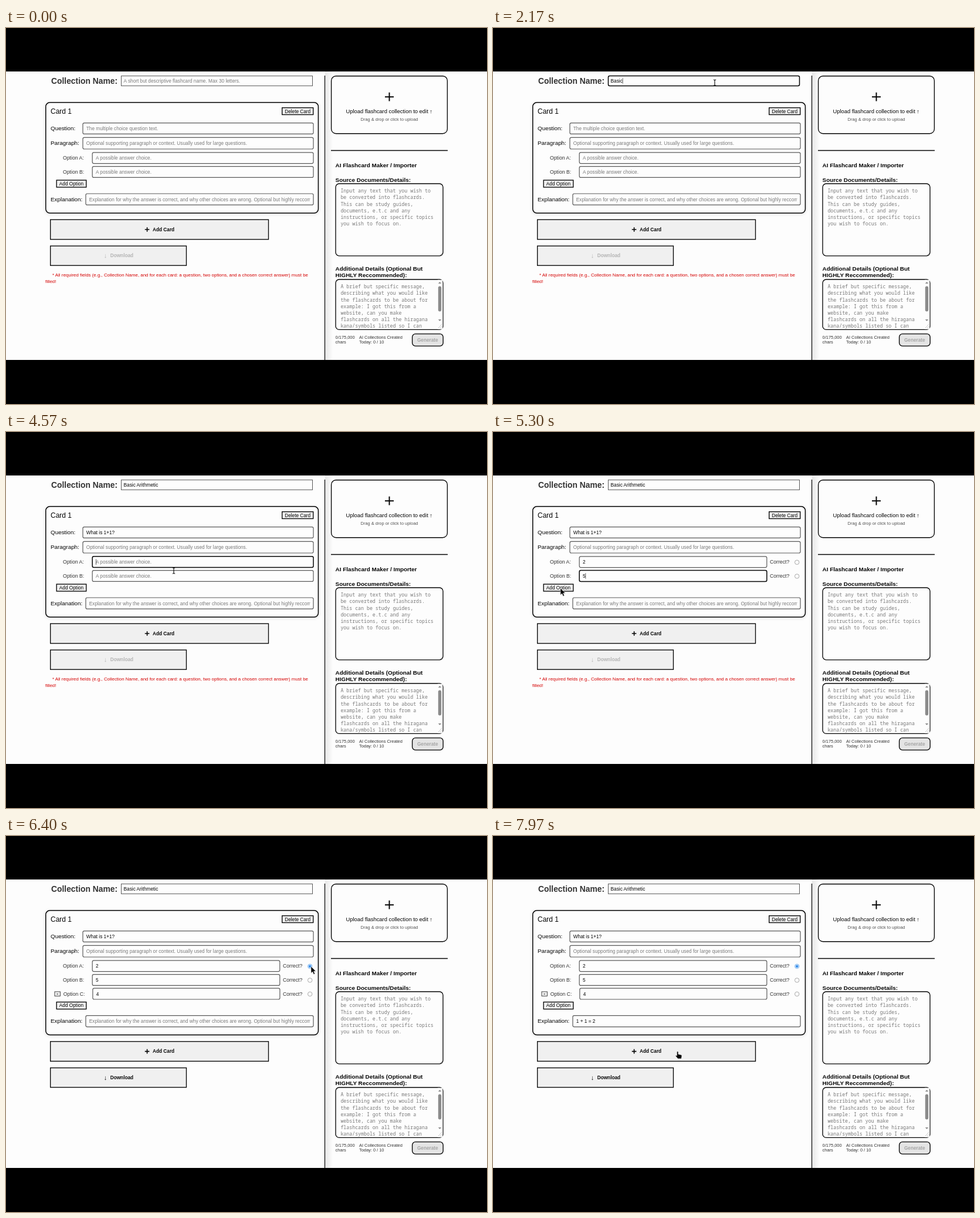
Recreate the animation shown at these times as an HTML page. Size 820 px wide and 640 px high, loop 8000 ms.

```html
<!DOCTYPE html>
<html lang="en">
<head>
<meta charset="utf-8">
<title>Flashcard maker</title>
<style>
html, body { margin: 0; width: 100%; height: 100%; overflow: hidden; background: #000; }
svg { display: block; width: 820px; height: 640px; }
text { font-family: "Liberation Sans", Arial, sans-serif; font-size: 8.25px; white-space: pre; }
.bold { font-weight: bold; }
.mono { font-family: "Noto Sans Mono", "DejaVu Sans Mono", monospace; }
.soft { filter: drop-shadow(0 1.5px 2.5px rgba(0, 0, 0, .15)); }
</style>
</head>
<body>
<svg id="stage" viewBox="0 0 820 640"></svg>
<script>
const LOOP = 8000, ROW = 23.6;
const PAGE = '#fdfdfd', INK = '#060606', SOFT = '#333', DIM = '#7a7a7a', BUTTON = '#f0f0f0', BLUE = '#3b90ea';
const SHIFT_AT = 5320, CORRECT_AT = 4980, PICK_AT = 6340;
const stage = document.getElementById('stage');

function el(tag, attrs, parent = stage, content) {
  const node = document.createElementNS('http://www.w3.org/2000/svg', tag);
  for (const key in attrs) node.setAttribute(key, attrs[key]);
  if (content !== undefined) node.textContent = content;
  parent.appendChild(node);
  return node;
}
const set = (node, attrs) => { for (const key in attrs) node.setAttribute(key, attrs[key]); };
const show = (node, on) => node.setAttribute('visibility', on ? 'visible' : 'hidden');
const group = (parent = stage) => el('g', {}, parent);

function box(x, y, w, h, parent, opts = {}) {
  return el('rect', { x, y, width: w, height: h, fill: PAGE, stroke: INK, 'stroke-width': 1.35, ...opts }, parent);
}
function label(x, y, str, parent, size = 8.25, opts = {}) {
  return el('text', { x, y, style: `font-size:${size}px;fill:${opts.fill || INK}`, class: opts.cls || '',
    'text-anchor': opts.anchor || 'start' }, parent, str);
}
function path(d, parent, opts = {}) {
  return el('path', { d, fill: 'none', stroke: INK, 'stroke-width': 1.4, ...opts }, parent);
}
function lines(x, y, pitch, rows, parent) {
  rows.forEach((row, i) => label(x, y + i * pitch, row, parent, 8.25, { cls: 'mono', fill: DIM }));
}

const defs = el('defs', {});
const fade = el('linearGradient', { id: 'fade' }, defs);
el('stop', { offset: 0, 'stop-color': '#e6e6e6' }, fade);
el('stop', { offset: 1, 'stop-color': PAGE }, fade);
const pageClip = el('clipPath', { id: 'page' }, defs);
el('rect', { x: 0, y: 74, width: 820, height: 491 }, pageClip);
const longClip = el('clipPath', { id: 'long' }, defs);
el('rect', { x: 138, y: 270, width: 380.5, height: 60 }, longClip);
const areaClip = el('clipPath', { id: 'area' }, defs);
el('rect', { x: 562, y: 429, width: 174, height: 82.5 }, areaClip);

el('rect', { width: 820, height: 640, fill: '#000' });
const page = el('g', { 'clip-path': 'url(#page)' });
el('rect', { y: 74, width: 820, height: 491, fill: PAGE }, page);

// Left column
label(77, 94.6, 'Collection Name:', page, 13.85, { cls: 'bold', fill: SOFT });
const card = box(67.8, 126.8, 464.6, 188.2, page, { rx: 7, 'stroke-width': 1.5, class: 'soft' });
label(76, 145.8, 'Card 1', page, 12);
box(470.7, 135.7, 53, 11.8, page, { fill: BUTTON });
label(497.2, 144.6, 'Delete Card', page, 8.25, { anchor: 'middle' });
label(76, 174.3, 'Question:', page, 9.9);
label(76, 199.3, 'Paragraph:', page, 9.9);
label(97, 224.2, 'Option A:', page, 8.67, { fill: SOFT });
label(97, 248, 'Option B:', page, 8.67, { fill: SOFT });

const rowC = group(page);
box(83, 265, 9.4, 7.4, rowC, { fill: BUTTON, stroke: SOFT, 'stroke-width': .9 });
path('M86.4 269h2.6', rowC, { 'stroke-width': .9 });
label(97.8, 271.6, 'Option C:', rowC, 8.67, { fill: SOFT });

const radios = [221.8, 245.5, 269].map((y, i) => {
  const g = group(page);
  label(472, y + 2.5, 'Correct?', g, 8.67, { fill: SOFT });
  const ring = el('circle', { cx: 518.2, cy: y, r: 3.7, fill: PAGE, stroke: '#858585', 'stroke-width': .7 }, g);
  const dot = el('circle', { cx: 518.2, cy: y, r: 2.4, fill: BLUE }, g);
  return { g, ring, dot, from: i < 2 ? CORRECT_AT : SHIFT_AT };
});

// Everything that slides down when a row is added
const lower = group(page);
box(86.2, 259, 50.6, 12, lower, { fill: BUTTON });
label(111.5, 267.9, 'Add Option', lower, 8.25, { anchor: 'middle' });
label(76, 294.6, 'Explanation:', lower, 9.9);
box(75.7, 326.2, 371.8, 33.6, lower, { fill: BUTTON });
path('M236.8 343h7.6M240.6 339.2v7.6', lower, { 'stroke-width': 1.6 });
label(250, 345.8, 'Add Card', lower, 8.25, { cls: 'bold' });
box(75.7, 371, 231.8, 33.2, lower, { fill: BUTTON });
const arrow = label(166.8, 391, '↓', lower, 11, { cls: 'bold' });
const download = label(177.7, 390.3, 'Download', lower, 8.25, { cls: 'bold' });
const warning = group(lower);
const red = { fill: '#d40000' };
label(79, 423.2, '* All required fields (e.g., Collection Name, and for each card: a question, two options, and a chosen correct answer) must be', warning, 7.92, red);
label(67, 434.3, 'filled!', warning, 7.92, red);

// Text fields: typing starts at `at`, one letter every `step` ms
const choice = 'A possible answer choice.';
const fields = [
  { x: 196.5, y: 81.6, w: 326, h: 16.8, pad: 4.1, rx: 0, thin: 1, hint: 'A short but descriptive flashcard name. Max 30 letters.',
    value: 'Basic Arithmetic', at: 1900, step: 60, focus: [1600, 3070] },
  { x: 131, y: 161.6, w: 393, h: 18.8, hint: 'The multiple choice question text.',
    value: 'What is 1+1?', at: 3120, step: 62, focus: [3070, 4400] },
  { x: 131, y: 186.4, w: 393, h: 19.6, hint: 'Optional supporting paragraph or context. Usually used for large questions.' },
  { x: 147.2, y: 211.8, w: 376.8, h: 18.8, narrow: 319.6, hint: choice, value: '2', at: 4680, focus: [4400, 4830] },
  { x: 147.2, y: 235.6, w: 376.8, h: 18.8, narrow: 319.6, hint: choice, value: '5', at: 4980, focus: [4830, 5310] },
  { x: 147.9, y: 259.2, w: 319, h: 18.8, from: SHIFT_AT, hint: choice, value: '4', at: 5690, focus: [5550, PICK_AT] },
  { x: 136, y: 282, w: 388, h: 19.2, slides: true, clip: 'url(#long)',
    hint: 'Explanation for why the answer is correct, and why other choices are wrong. Optional but highly reccommended.',
    value: '1 + 1 = 2', at: 7160, step: 58, focus: [7100, 7920] }
];
for (const f of fields) {
  f.pad = f.pad || 5.8;
  f.g = group(page);
  f.rect = box(f.x, f.y, f.w, f.h, f.g, { rx: f.rx ?? 2.5 });
  const inner = el('g', f.clip ? { 'clip-path': f.clip } : {}, f.g);
  f.text = label(f.x + f.pad, f.y + f.h / 2 + 2.9, f.hint, inner);
  f.caret = el('rect', { y: f.y + f.h / 2 - 4.8, width: .6, height: 9.6, fill: INK }, f.g);
}

// Right column
el('rect', { x: 544, y: 74, width: 13, height: 491, fill: 'url(#fade)' }, page);
path('M543.5 81V565', page, { 'stroke-width': 1.2 });
box(554.6, 81.7, 197.8, 98, page, { rx: 8 });
path('M646 117.2h15M653.5 109.8v14.8', page, { 'stroke-width': 2 });
label(653.3, 145.3, 'Upload flashcard collection to edit ↑', page, 9.4, { anchor: 'middle' });
label(653.5, 158, 'Drag & drop or click to upload', page, 7.43, { anchor: 'middle', fill: '#555' });
path('M554 208.5H753', page, { 'stroke-width': 1.3 });
label(561.6, 237.4, 'AI Flashcard Maker / Importer', page, 9.9, { cls: 'bold' });
label(561.6, 261.6, 'Source Documents/Details:', page, 9.9, { cls: 'bold' });
box(562, 265, 183, 122.8, page, { rx: 6 });
path('M740 387l4-4M742.6 387l1.6-1.6', page, { stroke: DIM, 'stroke-width': .6 });
lines(570.4, 280.3, 11.16, ['Input any text that you wish to', 'be converted into flashcards.', 'This can be study guides,',
  'documents, e.t.c and any', 'instructions, or specific topics', 'you wish to focus on.'], page);
label(561.6, 413, 'Additional Details (Optional But', page, 9.9, { cls: 'bold' });
label(561.6, 424.2, 'HIGHLY Reccommended):', page, 9.9, { cls: 'bold' });
box(562, 428, 183, 85.4, page, { rx: 6 });
const area = el('g', { 'clip-path': 'url(#area)' }, page);
lines(570.4, 443.2, 11.16, ['A brief but specific message,', 'describing what you would like', 'the flashcards to be about for',
  'example: I got this from a', 'website, can you make', 'flashcards on all the hiragana', 'kana/symbols listed so I can'], area);
// The scrollbar squares off the right corners
el('rect', { x: 736, y: 428.7, width: 8.3, height: 84, fill: PAGE }, page);
box(736.8, 439.5, 5.4, 43, page, { rx: 2.7, fill: '#8b8b8b', stroke: 'none' });
path('M736.8 435l2.7-3 2.7 3zM736.8 496l2.7 3 2.7-3z', page, { fill: '#8b8b8b', stroke: 'none' });
path('M737 511l6-7M740 511.5l3.6-4', page, { stroke: '#aaa', 'stroke-width': .6 });
[[561.6, 528.7, '0/175,000'], [561.6, 537.4, 'chars'], [602, 528.7, 'AI Collections Created'], [602, 537.4, 'Today: 0 / 10']]
  .forEach(([x, y, s]) => label(x, y, s, page, 7.43, { fill: SOFT }));
box(692.6, 520.6, 52.6, 20.8, page, { rx: 5.5, fill: '#e4e4e4' });
label(718.8, 533.9, 'Generate', page, 8.25, { cls: 'bold', anchor: 'middle', fill: '#a6a6a6' });

// Pointer
const pointer = group(page);
const shapes = {
  beam: path('M-2.2-5Q0-5 0-4Q0-5 2.2-5M0-4.4V4.4M-2.2 5Q0 5 0 4Q0 5 2.2 5', pointer, { 'stroke-width': 1.1 }),
  arrow: path('M0 0V11.4L2.6 9L4.6 13.4L6.6 12.5L4.7 8.2H8.2Z', pointer, { fill: INK, stroke: '#fff', 'stroke-width': .5 }),
  hand: path('M-1.4 .6Q-.3-.9 .8 .6V4.4L5.6 5.6Q7 6 6.8 7.6L6 12H.2L-3.6 7.6Q-3.6 6-1.4 7Z', pointer, { fill: INK, stroke: '#fff', 'stroke-width': .4 })
};
const moves = [
  [1150, 560, 66], [1550, 378, 93], [2880, 378, 93], [3060, 285, 174.5], [4150, 285, 174.5], [4370, 286, 221],
  [4480, 286, 221], [4640, 286, 246], [5040, 286, 246], [5280, 115, 266], [5380, 115, 266], [5530, 195, 270],
  [5640, 195, 270], [5750, 201, 283], [5900, 201, 283], [6300, 520, 222], [6880, 520, 222], [7080, 250, 315],
  [7680, 250, 315], [7910, 315, 367]
];
function pointerAt(t) {
  const next = moves.findIndex(m => m[0] > t);
  if (next < 0) return moves[moves.length - 1].slice(1);
  const [t0, x0, y0] = moves[next - 1], [t1, x1, y1] = moves[next];
  const k = (t - t0) / (t1 - t0), e = k * k * (3 - 2 * k);
  return [x0 + (x1 - x0) * e, y0 + (y1 - y0) * e];
}

function drawField(f, t, shift) {
  const dy = f.slides ? shift : 0;
  const count = f.value && t >= f.at ? Math.floor((t - f.at) / (f.step || 60)) + 1 : 0;
  const str = f.value ? f.value.slice(0, count) : '';
  const focused = !!f.focus && t >= f.focus[0] && t < f.focus[1];
  f.on = t >= (f.from || 0);
  f.width = f.narrow && t >= CORRECT_AT ? f.narrow : f.w;
  f.top = f.y + dy;
  show(f.g, f.on);
  set(f.g, { transform: `translate(0 ${dy})` });
  set(f.rect, { width: f.width, stroke: focused ? INK : '#5a5a5a', 'stroke-width': focused ? 1.5 : f.thin || 1.2,
    rx: focused ? 2.5 : f.rx ?? 2.5 });
  f.text.textContent = str || f.hint;
  f.text.style.fill = str ? INK : DIM;
  const end = str ? f.text.getComputedTextLength() : 0;
  set(f.caret, { x: f.x + f.pad + end, opacity: focused ? 1 : 0 });
}

function draw(t) {
  const shift = t >= SHIFT_AT ? ROW : 0, picked = t >= PICK_AT;
  set(card, { height: 188.2 + shift });
  set(lower, { transform: `translate(0 ${shift})` });
  show(rowC, shift > 0);
  for (const f of fields) drawField(f, t, shift);
  radios.forEach((r, i) => {
    const on = picked && i === 0;
    show(r.g, t >= r.from);
    set(r.dot, { opacity: on ? 1 : 0 });
    set(r.ring, { stroke: on ? BLUE : '#858585' });
  });
  arrow.style.fill = download.style.fill = picked ? INK : '#b4b4b4';
  show(warning, !picked);

  const active = t >= moves[0][0];
  show(pointer, active);
  const [x, y] = active ? pointerAt(t) : [0, 0];
  const inside = (l, top, w, h) => x >= l && x <= l + w && y >= top && y <= top + h;
  const kind = fields.some(f => f.on && inside(f.x, f.top, f.width, f.h)) ? 'beam'
    : inside(75, 326 + shift, 372, 34) ? 'hand' : 'arrow';
  for (const name in shapes) set(shapes[name], { display: name === kind ? 'inline' : 'none' });
  set(pointer, { transform: `translate(${x} ${y})` });
}

const start = performance.now();
function tick() {
  draw((performance.now() - start) % LOOP);
  requestAnimationFrame(tick);
}
tick();
</script>
</body>
</html>
```
